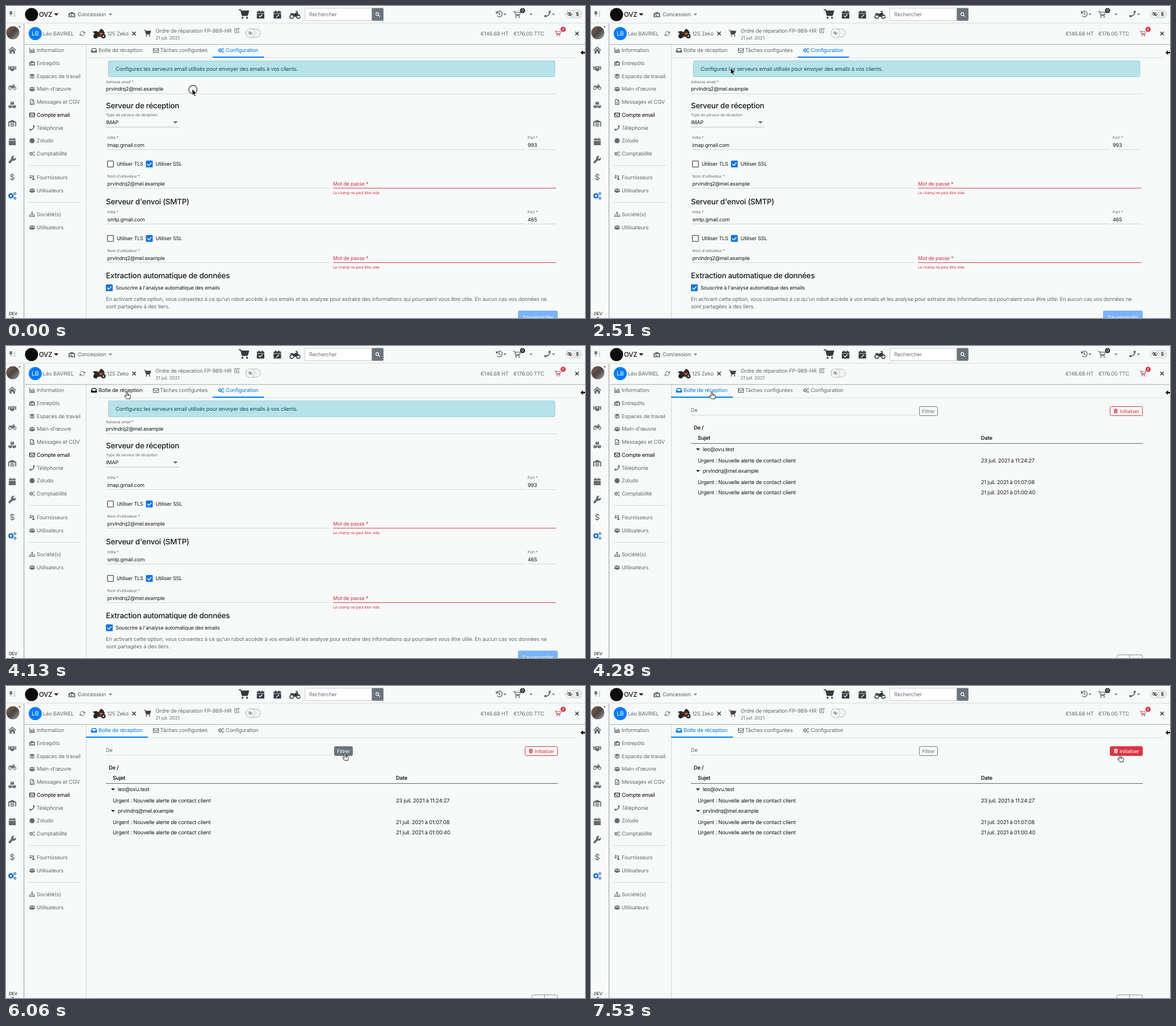
Write an HTML page that moves like this. It is 1020 by 549 pixels and loops after 8000 ms.

```html
<!DOCTYPE html>
<html lang="fr">
<head>
<meta charset="utf-8">
<title>Compte email</title>
<style>
html, body { margin: 0; width: 100%; height: 100%; overflow: hidden; background: #f8faf9; }
svg { display: block; width: 100%; height: 100%; }
text { font-family: Inter, "Open Sans", sans-serif; letter-spacing: -.02em; text-rendering: geometricPrecision; white-space: pre; }
</style>
</head>
<body>
<svg id="stage" viewBox="0 0 1020 549"></svg>
<script>
const GRAY = '#666b70', DARK = '#343a40', BLACK = '#16181b', BLUE = '#007bff', RED = '#dc3545';
const BASE = 9.35, FIELD = 9.1;
const MAIL = 'prvlndrq2@mel.example', MAIL2 = 'prvlndrq@mel.example';

const text = (x, y, s, size = BASE, fill = BLACK, more = '') =>
  `<text x="${x}" y="${y}" font-size="${size}" fill="${fill}" ${more}>${s}</text>`;
const line = (x1, y, x2, color = '#d3d6d8', w = 1) =>
  `<path d="M${x1} ${y}H${x2}" stroke="${color}" stroke-width="${w}"/>`;
const vline = (x, y1, y2, color) => `<path d="M${x} ${y1}V${y2}" stroke="${color}"/>`;
const rect = (x, y, w, h, fill, more = '') =>
  `<rect x="${x}" y="${y}" width="${w}" height="${h}" fill="${fill}" ${more}/>`;
const disc = (x, y, r, fill, more = '') => `<circle cx="${x}" cy="${y}" r="${r}" fill="${fill}" ${more}/>`;
const caret = (x, y, w, fill = GRAY) => `<path d="M${x - w / 2} ${y}h${w}l${-w / 2} ${w / 2}z" fill="${fill}"/>`;
const group = (id, body) => `<g id="${id}">${body}</g>`;

// Icons live in a 16 x 16 box and take the current colour.
const stroke = (d, w = 1.6) => `<path d="${d}" fill="none" stroke="currentColor" stroke-width="${w}"/>`;
const fill = d => `<path d="${d}" fill-rule="evenodd"/>`;
const gear = (x, y, r) => `<g fill="none" stroke="currentColor"><circle cx="${x}" cy="${y}" r="${r}" stroke-width="${r * .65}"/>` +
  `<circle cx="${x}" cy="${y}" r="${r * 1.45}" stroke-width="${r * .45}" stroke-dasharray="${r * .57}"/></g>`;
const person = (x, y, r) => disc(x, y, r, 'currentColor') +
  fill(`M${x - r * 1.6} ${y + r * 3.6}v${-r}q0 ${-r * 1.3} ${r * 1.6} ${-r * 1.3}t${r * 1.6} ${r * 1.3}v${r}z`);
const cube = (x, y) => fill(`M${x} ${y}l3.6 1.5v4l-3.6 1.6-3.6-1.6v-4zM${x} ${y + 1.2}l-2 .8 2 .9 2-.9z`);
const PAGE = 'M1 3h3V1h2v2h4V1h2v2h3v3H1zM1 7h14v9H1z';
const TRACK = 'M0 1h3l2.5 9H14M4 3h11.5L14 8.500H5z';
const icons = {
  home: fill('M8 1 0 8l1.300 1.400L8 3.600l6.700 5.800L16 8zM8 5.200 2.500 10v5h4v-4h3v4h4v-5z'),
  hands: fill('M0 4h2v7H0zM3 4.500h3L8 4l2-.500 3 1v6l-3 3-3 .500-4-3.500zM14 4h2v7h-2zM7 6l-1 2 2 .500 2-2 3 3v-.800L10 6z'),
  moto: stroke('M6 11a2.700 2.700 0 1 1-.1-.6M15.700 11a2.700 2.700 0 1 1-.1-.6M9 3.500h2l2 7', 1.4) + fill('M1 6h4l2 1 2-1.500h3l-1 4-2 2H7L5.500 8.500 1 7.500z'),
  cubes: cube(8, 1) + cube(4, 8) + cube(12, 8),
  store: fill('M0 5.500 8 1.500l8 4V15h-2V7H2v8H0zM4 8h8v1.600H4zM4 10.700h8v1.600H4zM4 13.400h8V15H4z'),
  depot: fill('M0 5.500 8 1.500l8 4V15H0zM3 7v7h10V7zM4.500 8.500h4v2h-4zM4.500 11.500h7v2h-7z'),
  calendar: fill(PAGE),
  check: fill(PAGE + 'M4 11l1-1 2 2 4-4 1 1-5 5z'),
  service: fill(PAGE + 'M5 14l4-4q0-2 2-2l-1 1 1 1 1-1q0 2-2 2l-4 4z'),
  wrench: fill('M15.500 4l-3 2.500-2-.600-.500-2L12.500 1a5 5 0 0 0-6.700 6L1 12a2.100 2.100 0 0 0 3 3l5-4.800A5 5 0 0 0 15.500 4z'),
  cogs: gear(5.5, 8, 3.2) + gear(13, 3.8, 1.7) + gear(13, 12.4, 1.7),
  chart: stroke('M1 1v13.500h15', 1.8) + fill('M3.500 6H6v7H3.500zM7 8h2v5H7zM10 3h2v10h-2zM13 6h2v7h-2z'),
  layers: fill('M8 1l8 3.500L8 8 0 4.500zM2 7l6 2.600L14 7l2 1-8 3.500L0 8zM2 10.500l6 2.600 6-2.600 2 1L8 15l-8-3.500z'),
  file: fill('M2 0h8l4 4v12H2zM4 2v12h8V5.500H9V2zM5 8h6v1.300H5zM5 11h6v1.300H5z'),
  mail: stroke('M1 3h14v10.500H1zM1 5l7 5 7-5'),
  phone: fill('M15.500 1 11.800 0 10 4l2 2a11 11 0 0 1-6 6l-2-2-4 1.800L1 15.500C9 15.500 15.500 9 15.500 1z'),
  users: person(3, 5, 1.9) + person(13, 5, 1.9) + person(8, 4.5, 2.7),
  carry: person(4, 2.5, 2) + person(11.5, 7, 2) + fill('M8 2h5v3H8z'),
  sitemap: fill('M6 1h4v4H6zM0 11h4v4H0zM6 11h4v4H6zM12 11h4v4h-4z') + stroke('M8 5v6M2 11V8h12v3', 1.3),
  inbox: fill('M3 2h10l3 6v6H0V8zM4 4L2.200 8H5l1 2h4l1-2h2.800L12 4z'),
  cart: stroke(TRACK, 1.5) + fill('M4 3h11.500L14 8.500H5z') + disc(6, 13.5, 1.5, 'currentColor') + disc(13, 13.5, 1.5, 'currentColor'),
  trolley: stroke(TRACK, 1.5) + disc(6, 13.5, 1.5, 'currentColor') + disc(13, 13.5, 1.5, 'currentColor'),
  edit: stroke('M9 3H1.500v11.500H13V9M5.500 10.500l.500-3 7-6.500 2 2-7 7z', 1.5),
  sync: stroke('M2 7a6.200 6.200 0 0 1 11.500-2M14 9a6.200 6.200 0 0 1-11.500 2') + fill('M15.500 1v6h-6zM.5 15V9h6z'),
  history: stroke('M2.500 5a6.500 6.500 0 1 1 .5 7M8 4v4.500l3 1.500', 1.7) + fill('M0 1l1 6.500 6-1z'),
  hidden: stroke('M0 8q8-9 16 0-8 9-16 0zM1 1l14 14') + disc(8, 8, 2.5, 'currentColor'),
  search: stroke('M11 6.500a4.700 4.700 0 1 1-9.400 0a4.700 4.700 0 0 1 9.400 0M10 10l5 5', 2.2),
  trash: fill('M1 2h4l1-1.500h4L11 2h4v2H1zM2 5h12l-1 11H3zM5 7v7h1V7zM7.500 7v7h1V7zM10 7v7h1V7z'),
  times: stroke('M3 3l10 10M13 3 3 13', 2.6),
  pin: fill('M1 1h7v1.500H7l1 4 1.500 2h-10L1 6.500l1-4H1zM3.800 8.500h1.400V14H3.800z') + fill('M13 2h2v2h-2zM13 7h2v2h-2zM13 12h2v2h-2z')
};
const icon = (name, cx, cy, size, color = GRAY) =>
  `<g transform="translate(${cx - size / 2} ${cy - size / 2}) scale(${size / 16})" color="${color}" fill="currentColor">${icons[name]}</g>`;

function topBar() {
  return line(0, 30, 1020, '#d4d6d8') + line(0, 31, 1020, '#edeeef') +
    icon('pin', 11, 14, 11) + disc(45, 15, 11.5, '#0b0b0b') +
    text(58, 19, 'OVZ', 11.6, '#111', 'font-weight="500"') + caret(88.5, 13, 8, '#111') +
    icon('depot', 116, 15, 11.5) + text(126, 18, 'Concession', BASE, '#5b6065') + caret(184, 13.5, 6) +
    icon('cart', 419, 14.5, 18, DARK) + icon('check', 448.5, 14.5, 15, DARK) +
    icon('service', 478, 14.5, 15, DARK) + icon('moto', 509, 15, 19, DARK) +
    rect(526.5, 4, 118, 21.5, '#fff', 'stroke="#c9cdd1"') + text(534, 18, 'Rechercher', BASE, '#6c757d') +
    rect(644.5, 3.5, 20.5, 22.5, '#6c757d', 'rx="2"') + icon('search', 655, 15, 8.5, '#fff') +
    icon('history', 869, 14, 12.5) + caret(879, 13.5, 5.5) +
    icon('trolley', 900, 15, 13) + disc(910, 8, 4.6, '#2c3136') +
    text(910, 10.4, '0', 6.5, '#fff', 'text-anchor="middle"') + caret(925, 13.5, 5.5) +
    icon('phone', 954, 14, 12) + caret(964.5, 13.5, 5.5) +
    rect(985.5, 7.500, 29, 13.5, '#e7e9ea', 'rx="6.700" stroke="#cfd3d6"') + disc(993, 14.2, 7.2, '#fff', 'stroke="#cfd3d6"') +
    icon('hidden', 993, 14.2, 9.5, '#222') + text(1004, 17.3, '$', 8, '#222', 'font-weight="600"');
}

function orderBar() {
  const bike = disc(158, 53, 4, '#222') + disc(171.500, 53, 4, '#222') + disc(171.500, 53, 1.8, '#b9b4ad') +
    '<path d="M153 45l6-1 4 2 4-6 4 2 3 5-5 7h-9z" fill="#2d2a2a"/><path d="M164 48l5-2 2 3-5 3z" fill="#b8532a"/>';
  return line(32, 67.5, 1020, '#b9bdc0') + line(32, 68.5, 1020, '#e6e8e9') +
    disc(51.5, 48.5, 11.5, BLUE) + text(51.5, 52.3, 'LB', 10.5, '#fff', 'text-anchor="middle"') +
    text(65, 52, 'Léo BAVRIEL', BASE, GRAY) + icon('sync', 134.5, 48.5, 10) +
    bike + text(178, 52, '125 Zeko', BASE, GRAY) + icon('times', 225.5, 48.5, 10, '#444') +
    icon('cart', 249, 48, 12.5, '#444') + text(263.5, 46.5, 'Ordre de réparation FP-989-HR', BASE, GRAY) +
    icon('edit', 407, 43, 10) + text(263.5, 59, '21 juil. 2021', 8.1, GRAY) +
    rect(422.5, 40.5, 26, 14.5, '#f1f2f2', 'rx="7.200" stroke="#b5b9bc"') + disc(430.5, 47.7, 7.7, '#fff', 'stroke="#b5b9bc"') +
    icon('hidden', 430.5, 47.7, 8) +
    text(836, 51.5, '€146.68 HT', BASE, GRAY) + text(894, 51.5, '€176.00 TTC', BASE, GRAY) +
    icon('trolley', 972, 48.5, 11, '#c2545e') + disc(981.500, 41, 4.6, RED) +
    text(981.5, 43.2, '6', 6, '#fff', 'text-anchor="middle"') + icon('times', 1006, 48.5, 9.5, '#333') +
    '<path d="M1012 82l4.500-4v2.700h5v2.600h-5V86z" fill="#000"/>';
}

function rail() {
  const names = ['home', 'hands', 'moto', 'cubes', 'store', 'calendar', 'wrench'];
  return vline(31.5, 31, 549, '#a9adb0') + vline(32.5, 31, 549, '#e2e4e5') +
    '<defs><linearGradient id="fur" x2="1" y2="1"><stop stop-color="#8a6348"/><stop offset=".5" stop-color="#4b4644"/><stop offset="1" stop-color="#9ba0a2"/></linearGradient></defs>' +
    disc(12, 47, 11.5, 'url(#fur)') + caret(24, 36, 4, '#333') +
    names.map((n, i) => icon(n, 11, 77.5 + i * 32.1, 14)).join('') +
    text(11, 306, '$', 14, GRAY, 'text-anchor="middle" font-weight="500"') +
    icon('cogs', 11, 334, 15, '#0b62c4') + text(5, 543.5, 'DEV', 7.6, '#333', 'font-weight="500"') +
    rect(10, 547.5, 4, 2, '#555');
}

function sidebar() {
  const items = [
    [77.5, 'chart', 'Information'], [100.5, 'depot', 'Entrepôts'], [123.5, 'layers', 'Espaces de travail'],
    [146, 'users', "Main-d'œuvre"], [169, 'file', 'Messages et CGV'], [191.5, 'mail', 'Compte email'],
    [214.5, 'phone', 'Téléphonie'], [237, '', 'Zoludo'], [260, 'cogs', 'Comptabilité'],
    [302, 'carry', 'Fournisseurs'], [324.5, 'users', 'Utilisateurs'],
    [366.5, 'sitemap', 'Société(s)'], [389.5, 'users', 'Utilisateurs']
  ];
  return vline(141.5, 68, 549, '#d3d6d8') + line(40, 280.5, 132) + line(40, 345.5, 132) +
    items.map(([y, name, label]) => {
      const color = name === 'mail' ? '#000' : GRAY;
      return (name ? icon(name, 46, y, 10, color) : disc(46, y, 4.5, GRAY)) + text(54, y + 3.4, label, BASE, color);
    }).join('');
}

function tabs() {
  const tab = (id, name, ix, x, label) => `<g id="${id}">` + icon(name, ix, 78, 10.5, 'inherit') +
    text(x, 81.2, label, BASE, 'currentColor') + '</g>';
  return line(141, 91, 1007, '#dcdfe1') + tab('tabInbox', 'inbox', 155, 163, 'Boîte de réception') +
    `<g color="${GRAY}">` + tab('tabTasks', 'mail', 264, 271.5, 'Tâches configurées') + '</g>' +
    tab('tabConfig', 'cogs', 379, 387, 'Configuration') +
    rect(0, 89, 0, 2, BLUE, 'id="ink"');
}

function checkbox(x, y, on, label) {
  const box = on
    ? rect(x, y - 6, 12, 12, '#0b74f0', 'rx="1.500"') + `<path d="M${x + 2.5} ${y}l2.600 2.700 4.500-5" fill="none" stroke="#fff" stroke-width="1.500"/>`
    : rect(x + .7, y - 5.3, 10.6, 10.6, 'none', 'rx="1" stroke="#555" stroke-width="1.300"');
  return box + text(x + 17, y + 3.4, label, 9);
}

function server(y, host, port) {
  const label = (x, dy, s) => text(x, y + dy, s, 6.8, GRAY);
  return label(178.5, 0, 'Hôte *') + text(178.5, y + 14.3, host, FIELD) + line(178, y + 19, 914) +
    label(919, 0, 'Port *') + text(919, y + 14.3, port, FIELD) + line(919, y + 19, 969) +
    checkbox(178, y + 44.5, false, 'Utiliser TLS') + checkbox(246.5, y + 44.5, true, 'Utiliser SSL') +
    label(178.5, 68.3, "Nom d'utilisateur *") + text(178.5, y + 82.5, MAIL, FIELD) + line(178, y + 87, 571) +
    text(576, y + 82, 'Mot de passe *', 9, '#d32f45') + line(576, y + 87, 969.5, '#dc3f52') +
    text(576, y + 97.7, 'Le champ ne peut être vide.', 6.6, '#d32f45');
}

function configView() {
  const head = (y, s) => text(176, y, s, 13.4, BLACK, 'font-weight="500"');
  return rect(180.5, 96.5, 786.5, 28, '#b8e2e9', 'rx="2" stroke="#93d2de"') +
    text(193, 113.6, 'Configurez les serveurs email utilisés pour envoyer des emails à vos clients.', BASE, '#0c5460') +
    text(176, 135.5, 'Adresse email *', 6.8, GRAY) + text(176, 149.2, MAIL, FIELD) + line(176, 154.5, 971.5) +
    head(179.5, 'Serveur de réception') + text(176, 193.5, 'Type de serveur de réception', 6.8, GRAY) +
    text(176, 207.5, 'IMAP', FIELD) + caret(298.5, 203, 8) + line(176, 213, 305, '#b9bdc0') +
    server(233.5, 'imap.gmail.com', '993') +
    head(348.7, "Serveur d'envoi (SMTP)") + server(364.5, 'smtp.gmail.com', '465') +
    head(479.2, 'Extraction automatique de données') +
    checkbox(176, 495.700, true, "Souscrire à l'analyse automatique des emails") +
    text(176, 519.3, "En activant cette option, vous consentez à ce qu'un robot accède à vos emails et les analyse pour extraire des informations qui pourraient vous être utile. En aucun cas vos données ne", BASE, GRAY) +
    text(176, 532.2, 'sont partagées à des tiers.', BASE, GRAY) +
    rect(902, 536, 70, 20, '#7ab4fa', 'rx="2.500"') + text(937, 550.5, 'Sauvegarder', BASE, '#eef5ff', 'text-anchor="middle"');
}

function inboxView() {
  const bold = (x, y, s) => text(x, y, s, BASE, BLACK, 'font-weight="600"');
  const sender = (y, s) => caret(188.5, y - 5, 7, BLACK) + text(197, y, s);
  const row = (y, date) => text(188, y, 'Urgent : Nouvelle alerte de contact client') + text(687, y, date);
  const button = (id, x, w, color, body) =>
    `<g id="${id}" color="${color}">` + rect(x, 106.5, w, 16, 'none', 'rx="2" stroke="currentColor"') + `<g>${body}</g></g>`;
  return text(176, 115.8, 'De', BASE, GRAY) + line(176, 121.5, 574) +
    button('filter', 578.5, 32, '#6c757d', text(594.5, 117.7, 'Filtrer', 8.7, 'currentColor', 'text-anchor="middle"')) +
    button('reset', 914.5, 57, RED, icon('trash', 924.5, 114.3, 8, 'inherit') + text(931.5, 117.7, 'Initialiser', 8.6, 'currentColor')) +
    bold(181, 146.5, 'De /') + bold(188, 165, 'Sujet') + bold(687, 165, 'Date') + line(176, 171.5, 972, '#60666b') +
    sender(185.3, 'leo@ovu.test') + row(204.5, '23 juil. 2021 à 11:24:27') +
    sender(223.3, MAIL2) + row(242.5, '21 juil. 2021 à 01:07:08') + row(261.2, '21 juil. 2021 à 01:00:40') +
    rect(926.5, 543.5, 45, 20, 'none', 'rx="2" stroke="#8d9398"') + vline(948.5, 543, 549, '#8d9398');
}

const cursors =
  group('ring', disc(1.3, 1, 7.4, 'none', 'stroke="#222" stroke-width="1.100"')) +
  group('arrow', '<path d="M0 0V11L2.500 8.800 4.300 12.800 6.200 12 4.500 8H8z" fill="#000" stroke="#fff" stroke-width=".8"/>') +
  group('hand', '<path d="M-1.200 1.200Q0-.8 1.200 1V5l4 1q1.500.5 1.200 2.500L5.600 11v2H-.5L-4 8.500q-.3-1.500 1-1.500L-1.200 8.200zM1.200 5v2.500M3.300 5.600v2" fill="#fff" stroke="#111" stroke-width=".9" stroke-linejoin="round"/>') +
  group('beam', '<path d="M-2.500-5.500Q0-5.500 0-4 0-5.500 2.500-5.500M0-4.500V4.500M-2.500 5.500Q0 5.500 0 4 0 5.500 2.500 5.500M-1.200 1.800H1.200" fill="none" stroke="#111" stroke-width="1.100"/>');

const stage = document.getElementById('stage');
stage.innerHTML = rect(0, 0, 1020, 549, '#f8faf9') + topBar() + orderBar() + rail() + sidebar() + tabs() +
  group('config', configView()) + group('inbox', inboxView()) + group('pointer', cursors);
const $ = id => document.getElementById(id);
const show = (id, on) => $(id).setAttribute('display', on ? 'inline' : 'none');

const LOOP = 8000, TICK = 147.75, LEAD = 11;
const path = [
  [0, 328, 146], [1, 317, 141], [2, 305, 136], [3, 305, 136], [4, 408, 175], [7, 408, 175], [8, 398, 170],
  [11, 352, 154], [15, 284, 128], [17, 246, 109], [19, 223, 93], [21, 214, 85], [22, 214, 85],
  [23, 214, 83], [26, 213, 80], [32, 213, 80], [33, 218, 85], [34, 232, 95], [36, 280, 110], [38, 400, 115],
  [40, 560, 118], [41, 597, 118], [45, 846, 122], [47, 915, 128], [48, 927, 126], [49, 930, 123], [51, 932, 120.5]
];

function pointAt(tick) {
  const i = path.findIndex(k => k[0] > tick);
  if (i < 0) return path[path.length - 1].slice(1);
  const [t0, x0, y0] = path[i - 1], [t1, x1, y1] = path[i], p = (tick - t0) / (t1 - t0);
  return [x0 + (x1 - x0) * p, y0 + (y1 - y0) * p];
}

function setButton(id, color, hover) {
  const box = $(id).firstChild;
  box.setAttribute('fill', hover ? color : 'none');
  box.setAttribute('stroke', color);
  box.nextSibling.setAttribute('color', hover ? '#fff' : color);
}

function draw(ms) {
  const tick = Math.floor((ms % LOOP + LEAD) / TICK);
  const [x, y] = pointAt(tick);
  const inbox = tick >= 29, overTab = tick >= 23 && tick <= 33;
  const overFilter = tick === 41, overReset = tick >= 49;
  const hand = overTab || overFilter || overReset;
  const beam = inbox && !hand && x < 574 && y > 102 && y < 117.5;

  show('config', !inbox);
  show('inbox', inbox);
  $('tabInbox').setAttribute('color', inbox ? BLUE : overTab ? BLACK : GRAY);
  $('tabConfig').setAttribute('color', inbox ? GRAY : BLUE);
  $('ink').setAttribute('x', inbox ? 141 : 364);
  $('ink').setAttribute('width', inbox ? 109 : 90.5);
  setButton('filter', '#6c757d', overFilter);
  setButton('reset', RED, overReset);

  $('pointer').setAttribute('transform', `translate(${x} ${y})`);
  show('ring', tick === 0);
  show('hand', hand);
  show('beam', beam);
  show('arrow', !hand && !beam);
}

const start = performance.now();
function loop() {
  draw(performance.now() - start);
  requestAnimationFrame(loop);
}
draw(0);
loop();
</script>
</body>
</html>
```
